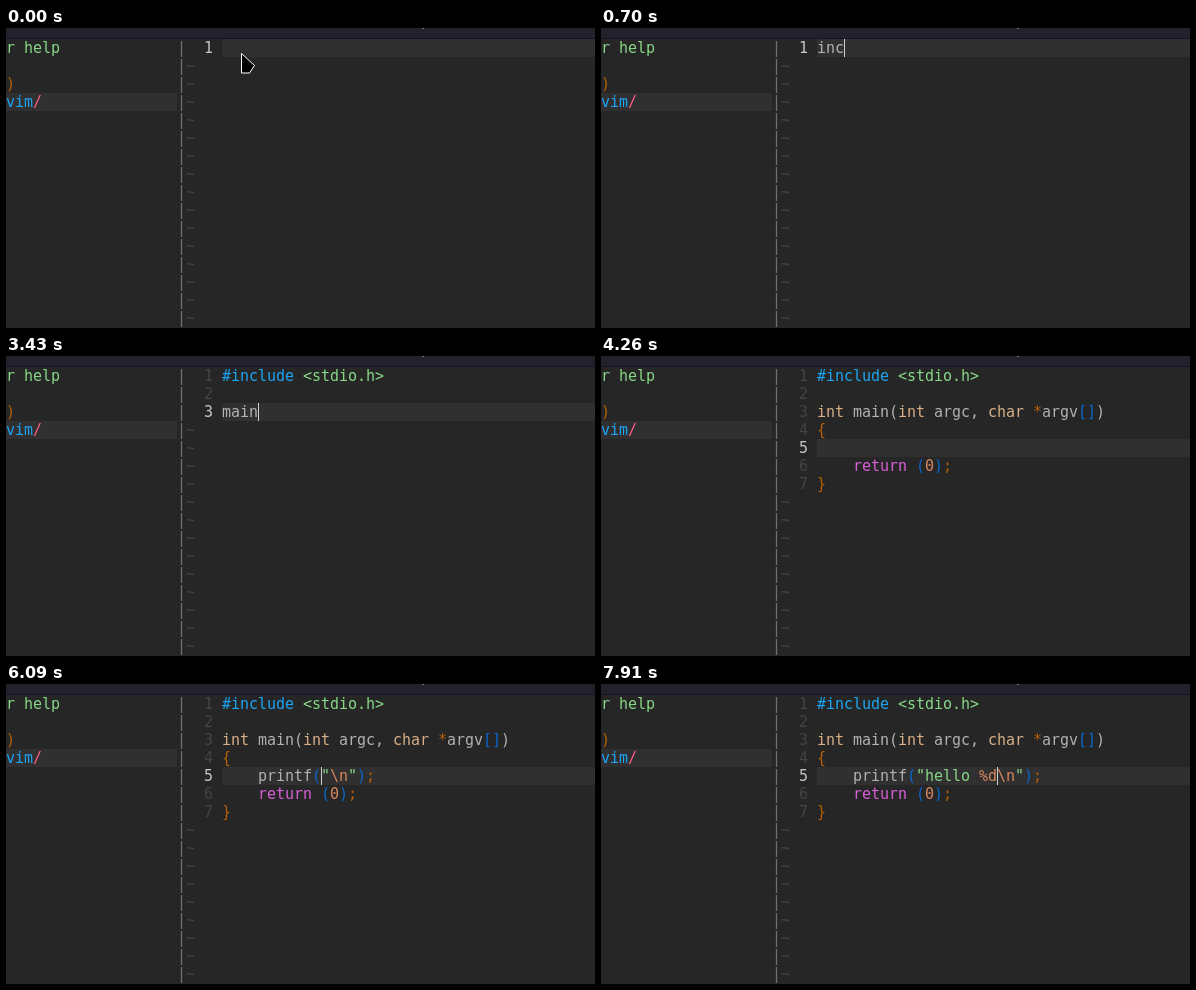
Write an HTML page with a canvas that moves like this. It is 589 by 300 pixels and loops after 8 s.

```html
<!DOCTYPE html>
<html lang="en">
<head>
<meta charset="utf-8">
<title>Snippets in an editor</title>
<style>
html, body { margin: 0; width: 100%; height: 100%; overflow: hidden; background: #262626; }
canvas { display: block; }
</style>
</head>
<body>
<canvas id="stage" width="589" height="300"></canvas>
<script>
const ctx = document.getElementById('stage').getContext('2d');
const LOOP = 8000, CELL = 9, ROW = 18, TOP = 11, CODE_X = 216;
const INK = {
  text: '#b2b2b2', blue: '#1ca5f5', green: '#87d787', tan: '#d7af87', brown: '#b65f08',
  paren: '#0b66cf', salmon: '#d7875f', pink: '#d75fd7', red: '#ff5f87',
  dim: '#444444', bar: '#707070', bright: '#c6c6c6'
};

const INCLUDE = [['blue', '#include '], ['green', '<stdio.h>']];
const MAIN = [['tan', 'int '], ['text', 'main('], ['tan', 'int '], ['text', 'argc, '], ['tan', 'char '],
  ['brown', '*'], ['text', 'argv'], ['paren', '[]'], ['text', ')']];
const RETURN = [['pink', '    return '], ['paren', '('], ['salmon', '0'], ['paren', ')'], ['brown', ';']];

const plain = s => [['text', s]];
const program = body => [INCLUDE, [], MAIN, [['brown', '{']], body, RETURN, [['brown', '}']]];
const typed = word => program(plain('    ' + word));
const call = (words, format = '') => program([['text', '    printf'], ['paren', '('], ['green', '"' + words],
  ['salmon', format + '\\n'], ['green', '"'], ['paren', ')'], ['brown', ';']]);

const WORDS = { col: -1, row: 1, width: 17, items: ['inline u inline', 'int    u int'] };
const PRINT = { col: 3, row: 5, width: 39, items: ['printf f int printf(const char *restrict format, ...)'] };

// [start, lines, active row, cursor column or null, popup]
const STEPS = [
  [0, [[]], 0, null],
  [350, [plain('i')], 0, 1],
  [480, [plain('in')], 0, 2],
  [610, [plain('in')], 0, 2, WORDS],
  [700, [plain('inc')], 0, 3],
  [1090, [INCLUDE], 0, 40],
  [1700, [INCLUDE], 0, null],
  [1740, [INCLUDE], 0, 40],
  [2000, [INCLUDE, []], 1, 0],
  [2430, [INCLUDE, [], []], 2, 0],
  [3170, [INCLUDE, [], plain('ma')], 2, 2],
  [3260, [INCLUDE, [], plain('mai')], 2, 3],
  [3430, [INCLUDE, [], plain('main')], 2, 4],
  [3780, typed(''), 4, 3],
  [4000, typed(''), 4, 4],
  [4260, typed(''), 4, null],
  [4870, typed('p'), 4, 5],
  [4980, typed('pr'), 4, 6],
  [5090, typed('pr'), 4, 6, PRINT],
  [5220, typed('pri'), 4, 7, PRINT],
  [5390, typed('prin'), 4, 8, PRINT],
  [5650, typed('print'), 4, 9, PRINT],
  [5870, typed('printf'), 4, 10, PRINT],
  [6040, typed('printf'), 4, 10],
  [6090, call(''), 4, 11],
  [6220, call(''), 4, 12],
  [6610, call('h'), 4, 13],
  [6740, call('he'), 4, 14],
  [7000, call('hel'), 4, 15],
  [7130, call('hell'), 4, 16],
  [7300, call('hello'), 4, 17],
  [7780, call('hello ', '%'), 4, 19],
  [7910, call('hello ', '%d'), 4, 20]
];

const rowY = row => TOP + row * ROW;

function box(color, x, y, w, h) {
  ctx.fillStyle = color;
  ctx.fillRect(x, y, w, h);
}

function print(x, row, parts) {
  for (const [ink, str] of parts) {
    ctx.fillStyle = INK[ink];
    for (const ch of str) {
      ctx.fillText(ch, x, rowY(row) + 14);
      x += CELL;
    }
  }
}

function drawFrame() {
  box('#262626', 0, 0, 589, 300);
  box('#22222d', 0, 0, 589, 10);
  box('#15122c', 0, 10, 589, 1);
  box('#77777f', 416, 0, 2, 1);
  box('#303030', 0, rowY(3), 171, ROW);
  print(0, 0, [['green', 'r help']]);
  print(0, 2, [['brown', ')']]);
  print(0, 3, [['blue', 'vim'], ['red', '/']]);
  for (let row = 0; row < 16; row++) print(171, row, [['bar', '|']]);
}

function drawPointer() {
  ctx.beginPath();
  ctx.moveTo(235.5, 25.5);
  ctx.lineTo(248.5, 37.5);
  ctx.lineTo(243.5, 45);
  ctx.lineTo(235.5, 45);
  ctx.closePath();
  ctx.fillStyle = '#000';
  ctx.fill();
  ctx.strokeStyle = '#fff';
  ctx.lineWidth = 1;
  ctx.stroke();
}

function drawPopup({ col, row, width, items }) {
  const x = CODE_X + col * CELL;
  items.forEach((item, i) => {
    box('#3a3a3a', x, rowY(row + i), width * CELL, ROW);
    print(x + CELL, row + i, plain(item));
  });
}

function draw(now) {
  const t = now % LOOP;
  const [start, lines, active, cursor, popup] = STEPS.findLast(step => step[0] <= t);
  ctx.font = '15px "DejaVu Sans Mono", monospace';
  drawFrame();
  box('#303030', CODE_X, rowY(active), 589 - CODE_X, ROW);
  for (let row = 0; row < 16; row++) {
    if (row < lines.length) {
      print(198, row, [[row === active ? 'bright' : 'dim', String(row + 1)]]);
      print(CODE_X, row, lines[row]);
    } else {
      print(180, row, [['dim', '~']]);
    }
  }
  if (popup) drawPopup(popup);
  if (cursor !== null) box('#d0d0d0', CODE_X + cursor * CELL, rowY(active), 1, ROW);
  if (start === 0) drawPointer();
  requestAnimationFrame(draw);
}
requestAnimationFrame(draw);
</script>
</body>
</html>
```
